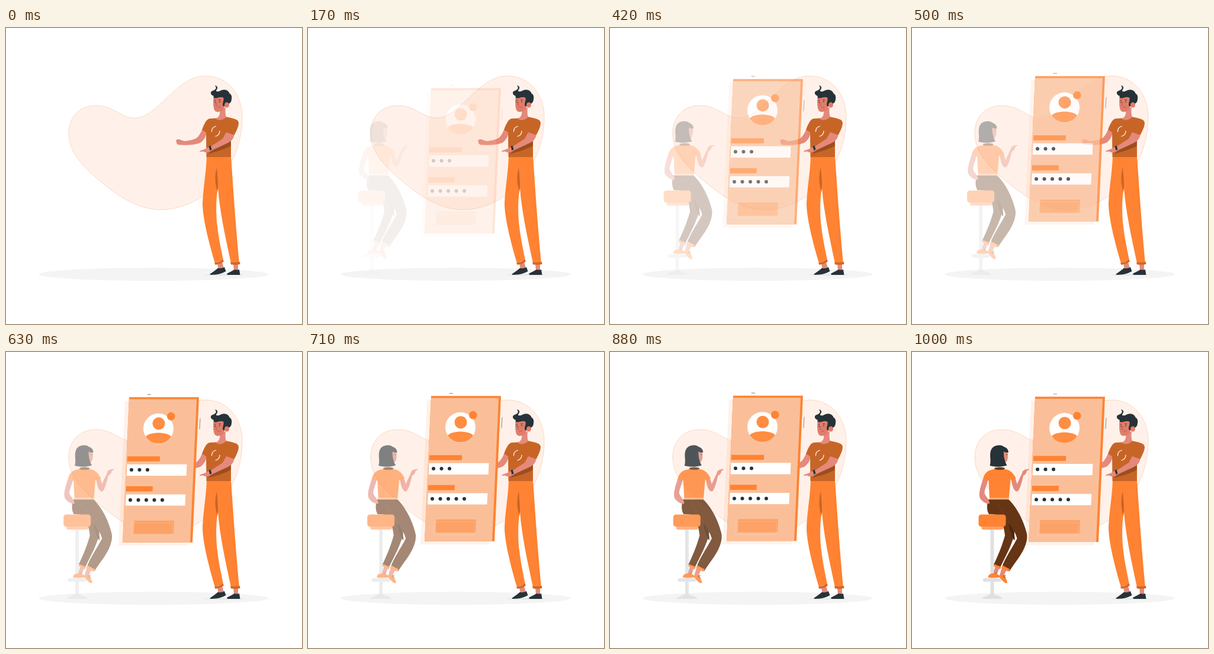
Recreate the animation shown at these times as an HTML page with a canvas. Size 500 by 500 pixels, loop 1040 ms.

```html
<!DOCTYPE html>
<html lang="en">
<head>
<meta charset="utf-8">
<title>Login illustration</title>
<style>
html, body { margin: 0; width: 100%; height: 100%; overflow: hidden; background: #fff; }
canvas { display: block; width: 500px; height: 500px; }
</style>
</head>
<body>
<canvas id="stage"></canvas>
<script>
const SIZE = 500, LOOP = 1040, FPS = 24, STEPS = 25;
const ORANGE = '#ff8332', RUST = '#c76527', SKIN = '#e4897b', FACE = '#df7d6c', INK = '#263238';
const BROWN = '#653515', GREY = '#e0e0e0', WARM = '#ff8d42';

const dpr = window.devicePixelRatio || 1;
const stage = document.getElementById('stage');

function context(canvas) {
  canvas.width = canvas.height = SIZE * dpr;
  return canvas.getContext('2d');
}

const main = context(stage);
const layer = document.createElement('canvas');
const side = context(layer);
let g = main;

function fill(color, d) {
  g.fillStyle = color;
  g.fill(new Path2D(d));
}

function line(color, width, d) {
  g.strokeStyle = color;
  g.lineWidth = width;
  g.lineCap = 'round';
  g.stroke(new Path2D(d));
}

function ellipse(color, x, y, rx, ry = rx) {
  g.fillStyle = color;
  g.beginPath();
  g.ellipse(x, y, rx, ry, 0, 0, Math.PI * 2);
  g.fill();
}

function box(color, x, y, w, h, r = 0) {
  g.fillStyle = color;
  g.beginPath();
  g.roundRect(x, y, w, h, r);
  g.fill();
}

// Box leaning like the phone's left and right edges
function leaning(x, y, w, h) {
  return `M${x} ${y}h${w}l${-h * 0.045} ${h}h${-w}Z`;
}

function backdrop() {
  const blob = 'M106 178C106 150 124 131 152 131C182 131 194 152 217 152C258 152 286 81 337 81' +
    'C374 81 399 112 399 150C399 192 385 232 350 269C329 291 294 307 262 307' +
    'C226 307 193 287 163 262C130 235 106 210 106 178Z';
  fill('#fff1e9', blob);
  line('#f6c3a1', 0.6, blob);
  ellipse('#f4f4f4', 249.5, 416, 194, 11);
}

function man() {
  ellipse('#d9e1e6', 368.5, 417, 34, 0.8);
  // Legs and feet
  fill(SKIN, 'M357 398L365 395L368 406L359 408Z');
  fill(SKIN, 'M384 398H392V410H385Z');
  fill(INK, 'M344 416C350 412 355 408 358 405.500Q364 407 369 404L371.500 411C366 414 358 417 346 417Z');
  fill(INK, 'M373 415C378 412 383 410 386 408Q390 409 394 408L395.500 417H374Z');
  fill(ORANGE, 'M339 217H380C383 255 386 310 394 397L380 397C370 350 361 310 358 270' +
    'C354 290 355 320 357 335C359 355 364 376 367 392L353 397C342 360 332 320 332 296C333 270 338 245 339 217Z');
  fill(RUST, 'M356 236C352 250 353 262 357 277L358 268C358 258 357 246 356 236Z');
  line('#ee7b2b', 0.6, 'M379 222C380 270 386 340 391 394');
  fill('#d0682a', 'M352 396.500Q360 396 366.500 391L368 394.500Q361 399 353.500 400Z');
  fill('#d0682a', 'M379 395.500Q387 396.500 395 395L395.500 399Q388 400.500 380 399.500Z');

  // Far arm
  fill(SKIN, 'M331 172L339 175C338 184 334 190 328 194C318 198 306 198 297 197.500C292 198 288 197 288 193' +
    'C286 190 288 187.500 292 188C297 189.500 299 191 303 191C311 190 320 188 324 184C327 180 329 177 331 172Z');
  // Neck and shirt
  fill(RUST, 'M354 152.500L344 153C338 154 334 164 331 172L338 176L338.500 218H380V180L385.500 181' +
    'C389 174 393 167 393 160C392 154 386 153 371 150Z');
  fill(SKIN, 'M361 138L371 134C370 143 371 148 372 150C368 156 358 157 354 153C360 151 362 146 361 138Z');
  line('#fff', 1.2, 'M347.500 175C347.500 170 350 167 354.500 166M354 183C358 182 361 179 361 174');
  fill('#9d4d1b', 'M341 213L350 205L374 194L380 189V199C367 206 354 209 341 213Z');

  // Near arm
  fill(SKIN, 'M372 176L385.500 181C384 188 380 192 373 195L347 207C341 211.500 336 210.500 333 208.500' +
    'L328 209C326 208 327 207.500 333 205.500C338 204 341 201 346 200L366 187Z');
  fill(INK, 'M342.500 200L345.500 198.500L347.500 205L344.500 207Z');

  // Head
  fill(FACE, 'M350.500 116C349.500 128 350.500 137 353 140C357 143.500 364 141.500 368 136L372 122L366 112Z');
  fill(INK, 'M353 97C356 97.500 358 100 357 102C356 104.500 354 106 355.500 107C360 108.500 363 104 368.500 104.200' +
    'C373 104.200 377 107.500 377.500 110.500C381 112 382 117 381 120C381 124 379 127 376 128C373 127 371 130 369 132.500' +
    'L366.500 131.500C365 127 368.500 123 367.500 118C363 115 358 119 352.500 118.500C350 117.500 351 115.500 350.500 114.500' +
    'C347 114 345 110.500 346.500 107.500C348.500 105.500 351 106 353.500 103.500C355.500 102 355 100 353 97Z');
  ellipse(FACE, 373, 130, 4, 4.5);
  ellipse(INK, 353.5, 125.5, 0.8, 1.1);
  ellipse(INK, 361, 124.5, 0.8, 1.1);
  line(INK, 0.8, 'M352 122.500L354 122M359.500 121.500L362.500 121.500');
  line('#b85048', 0.8, 'M356 126L354.500 130.500L356.500 131M357 134Q360 135 362 133');
}

function phone() {
  fill('rgba(255,131,48,.1)', 'M201 82H319L308 326.500H190Z');
  line('#b3947f', 1.2, 'M239 71H244.500M328 111.500L327 129.500');
  fill(ORANGE, 'M208 75.500H326L315 321H197Z');
  fill('#fabf99', 'M207.900 79H322L311 321H197Z');

  ellipse('#fff', 257.5, 128.5, 25.5);
  ellipse(WARM, 258, 120, 10.5);
  fill(WARM, 'M236 142C243 133.500 272 133.500 279 142A25.500 25.500 0 0 1 236 142Z');
  ellipse(ORANGE, 278.8, 107.8, 6.8);

  fill(ORANGE, leaning(205.2, 175.5, 55, 8.5));
  fill(ORANGE, leaning(203, 226, 45, 8.8));
  fill('#fff', leaning(204.5, 189, 101, 19.3));
  fill('#fff', leaning(202.8, 239.700, 100.500, 19));
  for (let i = 0; i < 5; i++) {
    if (i < 3) ellipse(INK, 212 + i * 13.5, 198.3, 3);
    ellipse(INK, 210 + i * 13.5, 249.2, 3);
  }
  fill('#fca267', leaning(216.5, 284, 67.5, 22.5));
  line('rgba(255,225,205,.3)', 0.7, leaning(213, 288, 68.5, 22));
}

function woman() {
  // Stool
  box(GREY, 132.5, 298, 6, 114);
  box(GREY, 120, 382, 31, 6, 2.5);
  fill(GREY, 'M118 417C118 413 128 412 132 409H139C143 412 153 413 153 417Z');

  // Feet
  fill(SKIN, 'M141 361L148 364L143 376L137 375Z');
  fill(SKIN, 'M152 364L160 368L155 377L148 377Z');
  fill(ORANGE, 'M128.500 381C129 376 132 374 138 374L145 375.500L151 380.500L141 381.500Z');
  fill(ORANGE, 'M147.500 377Q152 377.500 156 375C157 381 161 385 161 390C158 392 153 387 149 382Z');
  line(INK, 0.6, 'M154 379L158.500 377M155 381L158 380M141 375L144 372');

  // Trousers
  fill(BROWN, 'M148 258C160 278 170 290 173 300C175 315 158 345 149 364L138 359C145 345 153 325 157 310C156 300 154 290 145 274Z');
  fill('#4d270d', 'M163 288C170 296 174 306 173.500 318C169 316 166 304 163 288Z');
  fill(BROWN, 'M129 249H163C176 261 188 283 193.500 305C197 317 190 333 182 345C175 355 169 363 165 370L152 363' +
    'C157 348 170 330 177.500 315C173 300 165 290 158 284C150 274 138 274 130 274C126 268 126 258 129 249Z');
  line('#80502c', 0.5, 'M143 254C150 268 161 280 164 290');
  fill(ORANGE, 'M139.500 358.500L150.500 363L149 367L138 362Z');
  fill(ORANGE, 'M153 360.500L165.500 367L163 371L151 365Z');

  // Arms
  fill(SKIN, 'M120.500 213L128.500 216C125.500 228 121 236 123 240C126 246 131 250 131 256C126 257.500 119 253 115.500 248C111 240 117 224 120.500 213Z');
  fill(SKIN, 'M168 216L174 212C176 218 177 221 177.500 223C180 218 183 210 186 205C186 201 190 197.500 198 197.800' +
    'C199 199 193 200 193.500 203C193 206 190 208 188 209C186 218 183 230 179 235C174 238 169 228 168 216Z');

  // Top
  fill(ORANGE, 'M138 198H157C165 199 170 203 175.500 213L169 219L166.500 215L163.500 248H131L129.500 217.500L120 214.500C122 205 127 200 138 198Z');
  box('#ffad77', 131, 246, 32.5, 3.2, 1);
  ellipse('#6b3818', 148, 196.8, 9, 2.3);

  // Head
  fill(SKIN, 'M151 167L161 169C162.500 175 162.500 183 158.500 186L152 182Z');
  fill(INK, 'M131.500 192C134 184 131 176 132.500 169C134 161 140 157.500 147 157.500C150 157.500 153 158 155 160' +
    'C159 161 162.500 164 163 169.500C160 170.500 157 169.500 155 168C154.500 177 157 186 160.500 191.500C151 194.500 140 194.500 131.500 192Z');
  line(INK, 0.7, 'M159.500 173.500L161.500 173');

  box('#ffa167', 117.5, 292, 37, 8, 3);
  box(ORANGE, 112.5, 274.5, 46, 20.5, 4.5);
}

// Draws a part as one flat picture, then blends it in
function blend(draw, x, y, alpha) {
  g = side;
  g.setTransform(1, 0, 0, 1, 0, 0);
  g.clearRect(0, 0, layer.width, layer.height);
  g.setTransform(dpr, 0, 0, dpr, x * dpr, y * dpr);
  draw();
  g = main;
  g.save();
  g.setTransform(1, 0, 0, 1, 0, 0);
  g.globalAlpha = alpha;
  g.drawImage(layer, 0, 0);
  g.restore();
}

// Rise, then a small hover: [step, offset]
const rise = [[1, 33], [4, 26], [8, 16], [12, 5.7], [15, 0.8], [19, -2.2], [24, 0]];

function phoneY(k) {
  let i = 0;
  while (i < rise.length - 2 && k >= rise[i + 1][0]) i++;
  const at = n => rise[Math.max(0, Math.min(rise.length - 1, n))];
  const slope = n => (at(n + 1)[1] - at(n - 1)[1]) / (at(n + 1)[0] - at(n - 1)[0]);
  const [x0, y0] = at(i), [x1, y1] = at(i + 1), w = x1 - x0;
  const u = (k - x0) / w, v = 1 - u;
  return v * v * (1 + 2 * u) * y0 + u * u * (1 + 2 * v) * y1 + u * v * w * (v * slope(i) - u * slope(i + 1));
}

function stepAt(t) {
  let k = STEPS - 1;
  while (Math.round(k * 100 / FPS) * 10 > t) k--;
  return k;
}

function draw(k) {
  g = main;
  g.setTransform(dpr, 0, 0, dpr, 0, 0);
  box('#fff', 0, 0, SIZE, SIZE);
  backdrop();
  man();
  if (k < 2) return;
  blend(phone, 0, phoneY(k), Math.min(1, (k - 1.4) / 13.6));
  const p = (k - 1) / (STEPS - 2);
  const e = (p + p * p) / 2;
  blend(woman, -30 * (1 - e), 0, e);
}

const start = performance.now();
function tick(now) {
  draw(stepAt(Math.max(0, now - start) % LOOP));
  requestAnimationFrame(tick);
}
draw(0);
requestAnimationFrame(tick);
</script>
</body>
</html>
```
